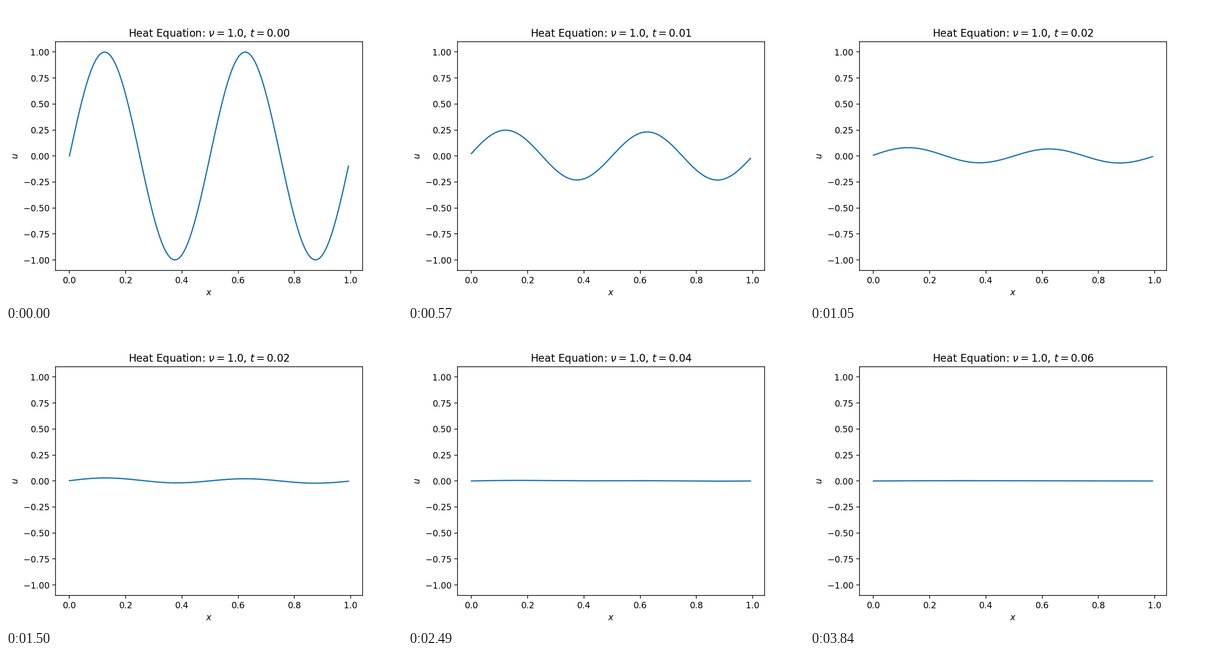
A matplotlib script that plays this animation: 864 px wide and 648 px high, repeating every 3870 ms.

```python
import numpy as np
import matplotlib.pyplot as plt
from matplotlib.animation import FuncAnimation

N = 128            # grid points
NU = 1.0           # diffusivity
FRAMES = 129
INTERVAL = 30      # ms
DX = 1 / N
DT = 8 * DX**2     # model time per frame

x = np.arange(N) * DX
u0 = np.sin(4 * np.pi * x)

# Eigenmodes of the discrete Laplacian with zero values just outside the grid
k = np.arange(1, N + 1)
modes = np.sqrt(2 / (N + 1)) * np.sin(np.pi * np.outer(k, k) / (N + 1))
rates = NU * (2 / DX * np.sin(np.pi * k / (2 * (N + 1))))**2
coeffs = modes @ u0


def solve(t):
    return modes @ (coeffs * np.exp(-rates * t))


def title_text(t):
    return rf"Heat Equation: $\nu={NU:.1f}$, $t={t:.2f}$"


fig, ax = plt.subplots(figsize=(6.4, 4.8), dpi=135)
line, = ax.plot(x, u0)
ax.set_xlim(ax.get_xlim())
ax.set_ylim(-1.1, 1.1)
ax.set_xlabel("$x$")
ax.set_ylabel("$u$")
title = ax.set_title(title_text(0))


def update(i):
    t = i * DT
    line.set_ydata(solve(t))
    title.set_text(title_text(t))
    return line, title


anim = FuncAnimation(fig, update, frames=FRAMES, interval=INTERVAL,
                     repeat=True, repeat_delay=0, blit=False)
plt.show()
```
